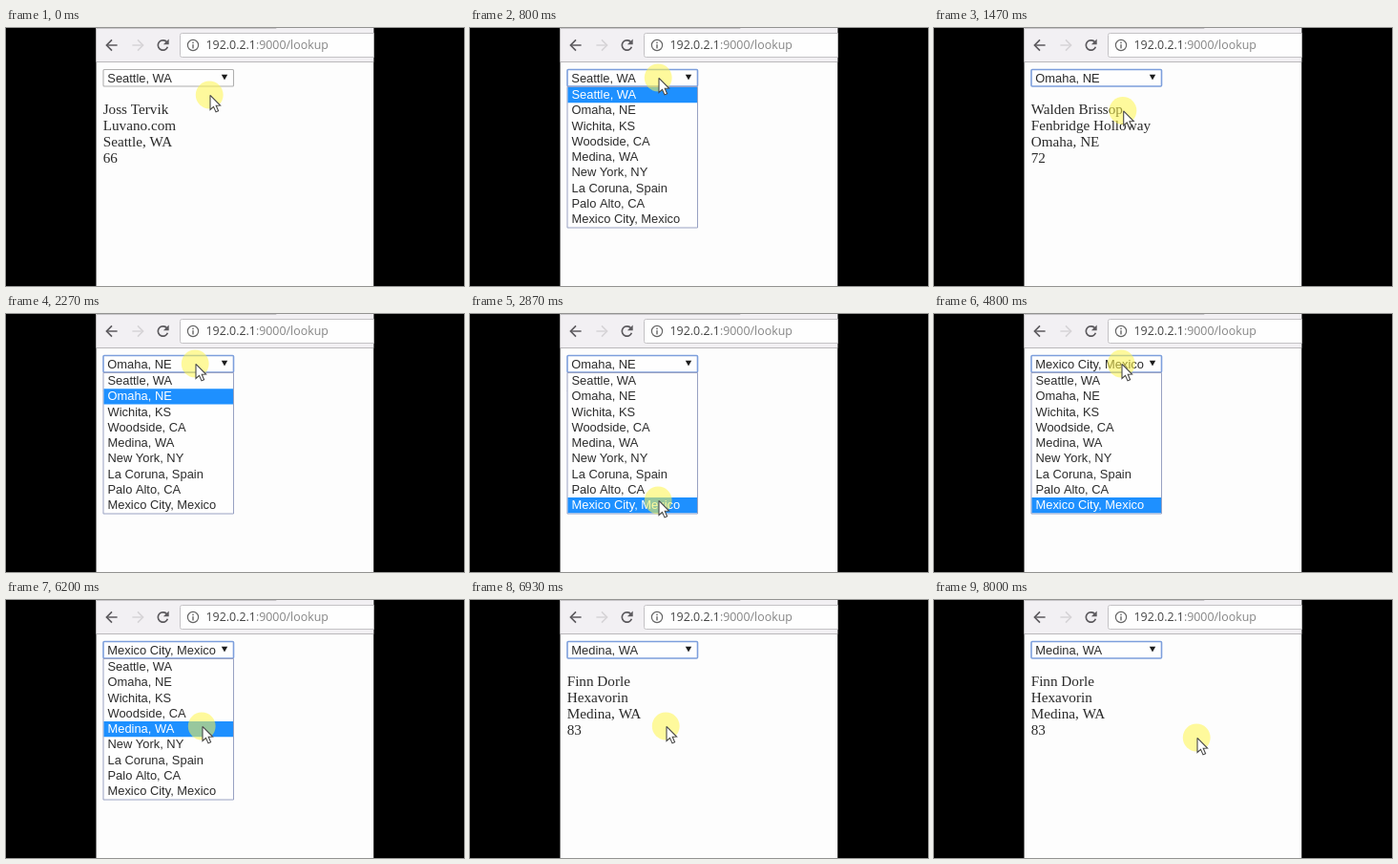
Animation of 480x270 px, one loop 8.07 s. Source, as an HTML page with a canvas:

```html
<!DOCTYPE html>
<html lang="en">
<head>
<meta charset="utf-8">
<title>City lookup</title>
<style>
  html, body { margin: 0; height: 100%; overflow: hidden; background: #000; }
  canvas { display: block; width: 480px; height: 270px; }
</style>
</head>
<body>
<canvas id="stage" width="480" height="270"></canvas>
<script>
const ctx = document.getElementById('stage').getContext('2d');
const LOOP = 8070, STEP = 1000 / 15;
const SANS = '12.9px "Liberation Sans", Arial, sans-serif';
const SERIF = '15.2px "Liberation Serif", "Times New Roman", serif';
const URL_FONT = '12.4px "Open Sans", "Noto Sans", sans-serif';
const LIST_TOP = 62, ROW = 16.25;
const LEFT = 94.3, WIDTH = 291.2;

const cities = ['Seattle, WA', 'Omaha, NE', 'Wichita, KS', 'Woodside, CA', 'Medina, WA',
  'New York, NY', 'La Coruna, Spain', 'Palo Alto, CA', 'Mexico City, Mexico'];

// Result shown for each chosen city: person, company, score
const results = {
  0: ['Joss Tervik', 'Luvano.com', 66],
  1: ['Walden Brissop', 'Fenbridge Holloway', 72],
  8: ['Andres Brun Tolo', 'Zelbor', 47],
  4: ['Finn Dorle', 'Hexavorin', 83]
};

// Pointer stops: time, x, y
const path = [
  [0, 214, 70], [70, 214, 70], [600, 198, 52], [930, 198, 52],
  [1270, 198.7, 86.5], [1800, 198.7, 86.5], [2130, 199, 52], [2330, 199, 52],
  [2800, 198, 195], [3800, 198, 195], [4330, 197, 52], [5400, 197, 52],
  [6130, 206, 132], [7070, 206, 132], [7800, 276, 144], [LOOP, 276, 144]
];

// Each visit to the list: opened, closed, city chosen
const visits = [[670, 1330, 1], [2200, 3200, 8], [4400, 6400, 4]];

function pointerAt(t) {
  const i = path.findIndex((p, k) => k && t <= p[0]);
  const [t0, x0, y0] = path[i - 1], [t1, x1, y1] = path[i];
  const u = (t - t0) / (t1 - t0), e = u * u * (3 - 2 * u);
  return [x0 + (x1 - x0) * e, y0 + (y1 - y0) * e];
}

function rect(x, y, w, h, fill) {
  ctx.fillStyle = fill;
  ctx.fillRect(x, y, w, h);
}

function text(str, x, y, font, fill) {
  ctx.font = font;
  ctx.fillStyle = fill;
  ctx.fillText(str, x, y);
}

function line(points, color, width) {
  ctx.beginPath();
  points.forEach(p => ctx.lineTo(...p));
  ctx.strokeStyle = color;
  ctx.lineWidth = width;
  ctx.stroke();
}

function poly(points, fill) {
  ctx.beginPath();
  points.forEach(p => ctx.lineTo(...p));
  ctx.closePath();
  ctx.fillStyle = fill;
  ctx.fill();
}

function box(x, y, w, h, r, fill, stroke, width) {
  ctx.beginPath();
  ctx.roundRect(x, y, w, h, r);
  ctx.fillStyle = fill;
  ctx.fill();
  ctx.strokeStyle = stroke;
  ctx.lineWidth = width;
  ctx.stroke();
}

function arrow(x, dir, color) {
  line([[x - 5.6 * dir, 18], [x + 5.6 * dir, 18]], color, 1.6);
  line([[x, 12.4], [x + 5.6 * dir, 18], [x, 23.6]], color, 1.6);
}

function toolbar() {
  rect(LEFT, 0, WIDTH, 35, '#f2f0f3');
  rect(LEFT, 0, 189, 1, '#c8c6c9');
  rect(LEFT, 35, WIDTH, 1, '#bab8bb');
  arrow(111, -1, '#5c5a5e');
  arrow(138, 1, '#d6d4d7');

  ctx.beginPath();
  ctx.arc(164.5, 18, 5.2, 0.35, 5.5);
  ctx.strokeStyle = '#5c5a5e';
  ctx.lineWidth = 1.7;
  ctx.stroke();
  poly([[170.7, 11.4], [170.7, 17.2], [164.9, 17.2]], '#5c5a5e');

  box(182.5, 5.5, 220, 25, 2, '#fefefe', '#c4c2c5', 1);
  ctx.beginPath();
  ctx.arc(196, 18, 5.6, 0, 7);
  ctx.strokeStyle = '#666';
  ctx.lineWidth = 1.2;
  ctx.stroke();
  rect(195.3, 14.6, 1.4, 1.6, '#666');
  rect(195.3, 17.2, 1.4, 4.2, '#666');

  const host = '192.0.2.1';
  text(host, 209.5, 22.3, URL_FONT, '#444');
  text(':9000/lookup', 209.5 + ctx.measureText(host).width, 22.3, URL_FONT, '#858585');
}

function selectBox(chosen, focused) {
  box(102, 43.5, 136.5, 17.5, 1, '#fefefe', focused ? '#7d9fdc' : '#b0b0b0', focused ? 1.6 : 1.1);
  text(cities[chosen], 106.3, 56.5, SANS, '#2c2c2c');
  poly([[225.8, 48.7], [232.2, 48.7], [229, 54.6]], '#1c1c1c');
}

function details(chosen) {
  const [person, company, score] = results[chosen];
  [person, company, cities[chosen], score].forEach((s, i) =>
    text(s, 101.7, 90 + i * 17.1, SERIF, '#2a2a2a'));
}

function list(active) {
  box(102, 61.5, 136.5, 147.5, 0, '#fefefe', '#98a1c2', 1);
  cities.forEach((city, i) => {
    const y = LIST_TOP + i * ROW, on = i === active;
    if (on) rect(102.5, y, 135.5, ROW, '#1e90ff');
    text(city, 106.5, y + 12, SANS, on ? '#fff' : '#2c2c2c');
  });
}

function pointer(x, y) {
  ctx.beginPath();
  ctx.arc(x - 0.8, y, 14.4, 0, 7);
  ctx.fillStyle = 'rgba(255,245,75,.54)';
  ctx.fill();
  const shape = [[0, 0], [0, 15.2], [3.5, 12], [6, 17.6], [8.6, 16.5], [6.2, 11], [10.6, 10.8], [0, 0]]
    .map(([dx, dy]) => [x + dx, y + dy + 0.3]);
  poly(shape, '#fff');
  line(shape, '#484848', 1.1);
}

function draw(now) {
  const t = Math.floor((now % LOOP) / STEP + 0.05) * STEP;
  const [x, y] = pointerAt(Math.min(t, LOOP));
  const done = visits.filter(v => t >= v[1]);
  const chosen = done.length ? done[done.length - 1][2] : 0;
  const open = visits.some(v => t >= v[0] && t < v[1]);

  rect(0, 0, 480, 270, '#000');
  ctx.save();
  ctx.beginPath();
  ctx.rect(LEFT, 0, WIDTH, 270);
  ctx.clip();
  rect(LEFT, 0, WIDTH, 270, '#fdfdfd');
  toolbar();
  details(chosen);
  selectBox(chosen, t >= visits[0][0]);
  if (open) {
    const hover = Math.floor((y - LIST_TOP) / ROW);
    list(hover < 0 ? chosen : Math.min(hover, cities.length - 1));
  }
  pointer(x, y);
  ctx.restore();
}

const start = performance.now();
function frame() {
  draw(performance.now() - start);
  requestAnimationFrame(frame);
}
frame();
</script>
</body>
</html>
```
